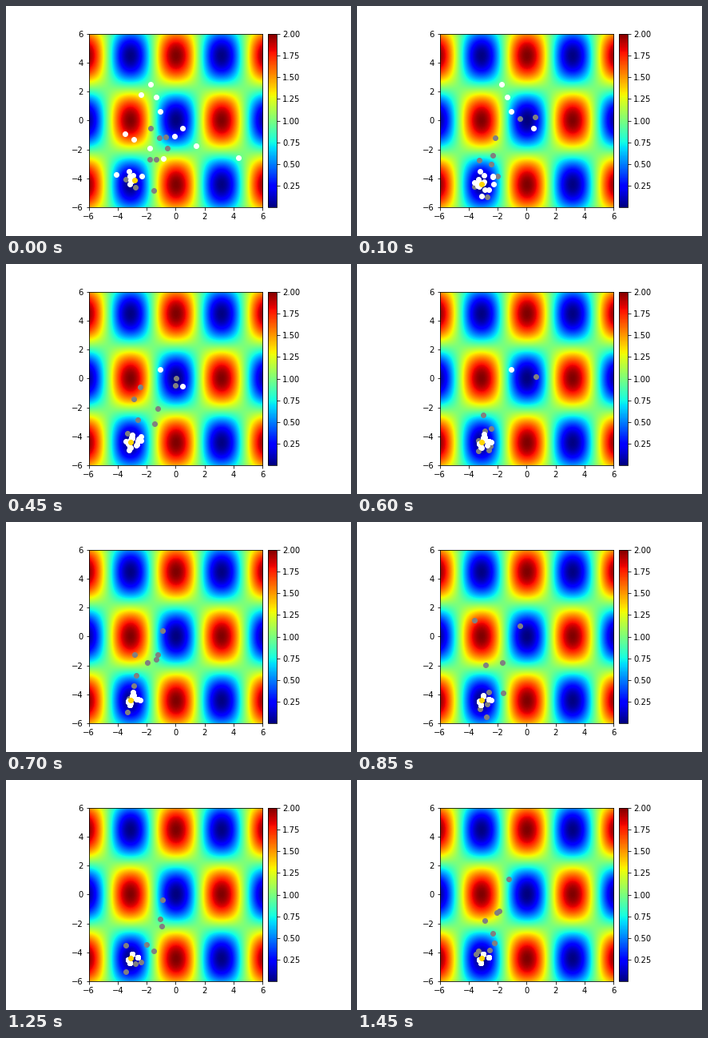
A matplotlib script that plays this animation: 432 px wide and 288 px high, repeating every 1.5 s.

```python
import math
import random

import numpy as np
import matplotlib.pyplot as plt
from matplotlib.animation import FuncAnimation
from mpl_toolkits.axes_grid1 import make_axes_locatable

FRAMES, STEP = 30, 50
LIM = 6
VALLEY = (-3.11, -4.42)

# First solutions, those replaced soonest come first
STARTS = [
    (-2.41, 1.8), (-3.51, -0.95), (1.44, -1.75), (-1.76, -1.9), (-3.16, -3.85),
    (-2.91, -1.3), (-0.08, -1.1), (-0.86, -2.65), (4.34, -2.6), (-4.11, -3.75),
    (-3.01, -4.2), (-3.05, -4.0), (-3.1, -4.1), (-3.16, -4.4), (-1.71, 2.5),
    (-2.36, -3.85), (-1.36, 1.6), (-3.23, -3.5), (-2.96, -3.8), (0.47, -0.52),
    (-1.06, 0.6),
]
# Places around the minimum where all solutions end up
ENDS = [(-2.98, -4.1), (-2.61, -4.35), (-3.26, -4.5), (-3.14, -4.72)]


def griewank(x, y):
    return 1 + (x**2 + y**2) / 4000 - np.cos(x) * np.cos(y / math.sqrt(2))


def solution(i, step):
    """Stay at the start, then hop ever closer to one of the end places."""
    leave = 1 + int(16 * (i / len(STARTS)) ** 4)
    if step < leave:
        return STARTS[i]
    hop = (step + i) // 4
    rng = random.Random(100 * i + hop)
    spread = max(0, 0.5 * (1 - hop / 5))
    x, y = ENDS[i % len(ENDS)]
    return x + rng.gauss(0, 0.8 * spread), y + rng.gauss(0, spread)


def trial(rng):
    """A rejected guess, mostly near the valley, sometimes far up the slope."""
    far = rng.random() ** 1.5
    return (rng.gauss(-3.2 + 2.6 * far, 0.5 + 0.5 * far),
            rng.gauss(-4.7 + 5.2 * far, 0.5))


def best(step):
    gap = 0.05**step
    return VALLEY[0] + 0.25 * gap, VALLEY[1] + 0.3 * gap


plt.rcParams.update({"font.family": "DejaVu Sans", "font.size": 10})
fig = plt.figure(figsize=(6, 4), dpi=72, facecolor="white")
fig.subplots_adjust(left=0.125, right=0.9, bottom=0.125, top=0.88)
ax = fig.add_subplot()

cells = 100
mid = (np.arange(cells) + 0.5) * 2 * LIM / cells - LIM
field = ax.imshow(griewank(*np.meshgrid(mid, mid)), cmap="jet", origin="lower",
                  extent=(-LIM, LIM, -LIM, LIM), interpolation="bilinear")
bar_ax = make_axes_locatable(ax).append_axes("right", size="5%", pad=0.1)
fig.colorbar(field, cax=bar_ax, ticks=np.arange(0.25, 2.01, 0.25),
             format="%.2f")
ticks = range(-LIM, LIM + 1, 2)
ax.set(xlim=(-LIM, LIM), ylim=(-LIM, LIM), xticks=ticks, yticks=ticks)

trial_dots, kept_dots, best_dot = (
    ax.scatter([], [], s=36, c=color, zorder=2 + k / 10)
    for k, color in enumerate(("gray", "white", "gold")))


def update(step):
    rng = random.Random(step)
    trial_dots.set_offsets([trial(rng) for _ in range(9)])
    kept_dots.set_offsets([solution(i, step) for i in range(len(STARTS))])
    best_dot.set_offsets([best(step)])
    return trial_dots, kept_dots, best_dot


anim = FuncAnimation(fig, update, frames=FRAMES, interval=STEP,
                     repeat=True, repeat_delay=0)
plt.show()
```
